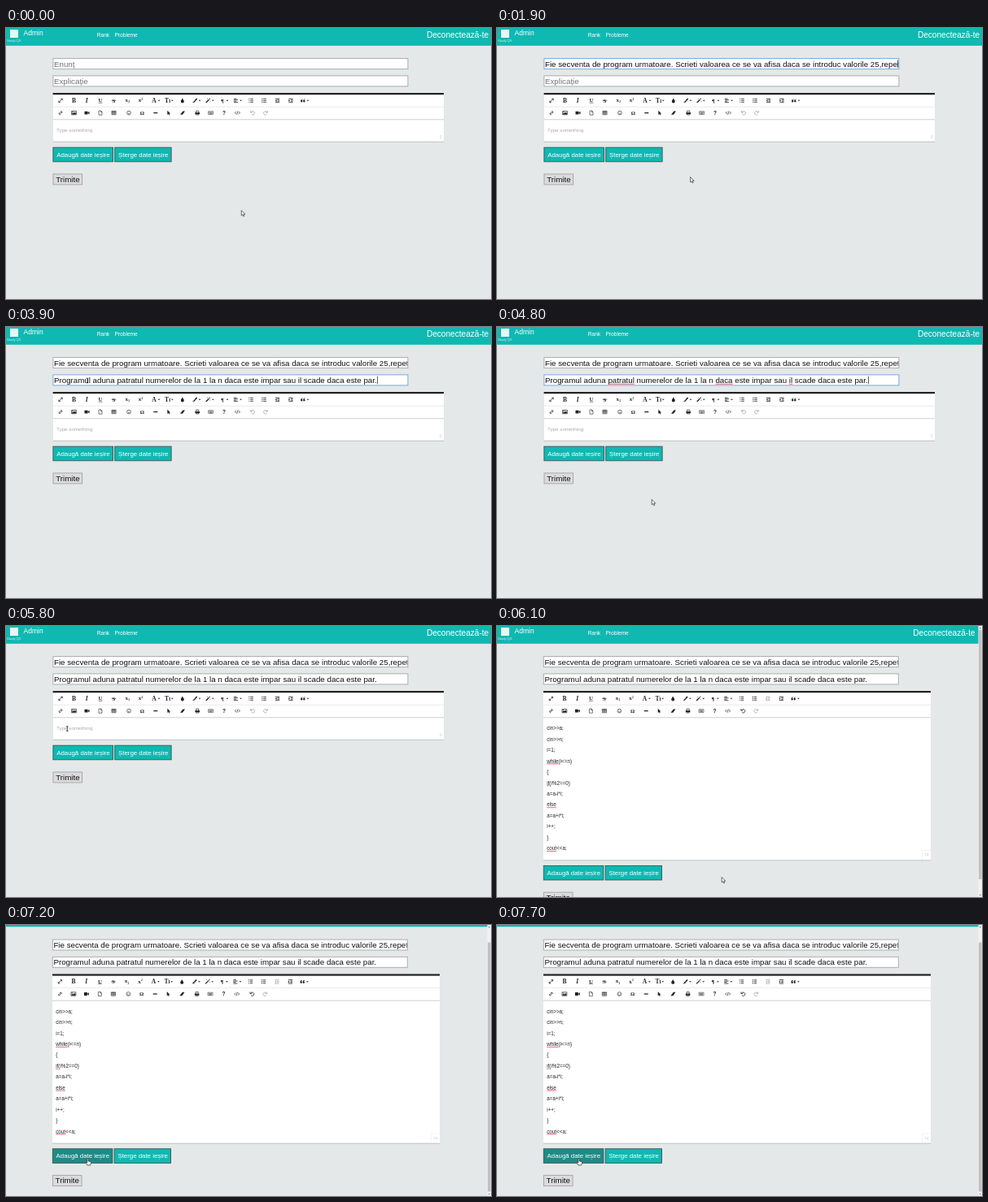
An HTML page for the animation above (8000 ms loop, 596 by 334 pixels).

```html
<!DOCTYPE html>
<html lang="ro">
<head>
<meta charset="utf-8">
<style>
html, body { margin: 0; width: 100%; height: 100%; overflow: hidden; background: #e4e8e8; }
svg { display: block; width: 596px; height: 334px; font-family: "Liberation Sans", Arial, sans-serif; }
text { white-space: pre; }
.serif { font-family: "Liberation Serif", serif; font-weight: bold; }
.icon { stroke: #222; fill: none; }
.icon text, .icon .solid { fill: #222; stroke: none; }
.dim { opacity: .4; }
</style>
</head>
<body>
<svg id="stage" viewBox="0 0 596 334"></svg>
<script>
const LOOP = 8000, TEAL = '#10b8b2', BG = '#e4e8e8';
const stage = document.getElementById('stage');
const pen = document.createElement('canvas').getContext('2d');

const esc = s => s.replace(/&/g, '&amp;').replace(/</g, '&lt;');
const text = (x, y, size, s, fill = '#111', extra = '') =>
  `<text x="${x}" y="${y}" font-size="${size}" fill="${fill}" ${extra}>${esc(s)}</text>`;
const rect = (x, y, w, h, fill, stroke = 'none', extra = '') =>
  `<rect x="${x}" y="${y}" width="${w}" height="${h}" fill="${fill}" stroke="${stroke}" ${extra}/>`;
const path = (d, width = .8, extra = '') => `<path d="${d}" stroke-width="${width}" ${extra}/>`;
const solid = d => `<path class="solid" d="${d}"/>`;
const serif = (s, size = 7.5, x = 0, y = 2.4, extra = '') =>
  text(x, y, size, s, '#222', `class="serif" text-anchor="middle" ${extra}`);

function width(s, size) {
  pen.font = '100px "Liberation Sans", Arial, sans-serif';
  return pen.measureText(s).width * size / 100;
}
function misspelt(x, y, size, line, start, length) {
  const from = x + width(line.slice(0, start), size);
  const to = from + width(line.substr(start, length), size);
  return `<path d="M${from} ${y}H${to}" stroke="#e0455a" stroke-width=".8"/>`;
}

const TASK = 'Fie secventa de program urmatoare. Scrieti valoarea ce se va afisa daca se introduc valorile 25,repetat';
const NOTE = 'Programul aduna patratul numerelor de la 1 la n daca este impar sau il scade daca este par.';
const CODE = ['cin>>a;', 'cin>>n;', 'i=1;', 'while(i<=n)', '{', 'if(i%2==0)', 'a=a-i*i;',
  'else', 'a=a+i*i;', 'i++;', '}', 'cout<<a;'];
const FLAGGED = ['while', 'if', 'else', 'cout'];

const LIST = 'M-.8-2H2.8M-.8 0H2.8M-.8 2H2.8';
const DENT = 'M-2.6-2.2H2.6M0-.7H2.6M0 .8H2.6M-2.6 2.3H2.6';
const UNDO = path('M-1.8-.6A2.2 2.2 0 1 1-1.4 1.7M-2.4-2.6V-.4H-.2', .8);

// [x, drawing, has a dropdown arrow, name]
const ROW1 = [
  [67, path('M-2 2L2-2M.2-2.2H2.2V-.2M-2.2.2V2.2H-.2')],
  [83.5, serif('B')],
  [99.2, serif('I', 7.5, 0, 2.4, 'font-style="italic"')],
  [116, serif('U', 6.8, 0, 1.8) + path('M-2.4 2.8H2.4', .6)],
  [132.5, serif('S', 7) + path('M-2.8 0H2.8', .6)],
  [149, serif('x', 7, -.8, 1.6) + serif('2', 3.6, 2.1, 3)],
  [165.3, serif('x', 7, -.8, 2) + serif('2', 3.6, 2.1, -.6)],
  [182, serif('A'), 1],
  [198.3, serif('T', 7.5, -.8) + serif('I', 6, 2.8, 2.4), 1],
  [216.8, solid('M0-2.8C.8-1.2 2 0 2 1.1A2 1.9 0 0 1-2 1.1C-2 0-.8-1.2 0-2.8Z')],
  [232, path('M2.6-2.4L.2.4', 1.6) + solid('M-.6 0L.8 1.2Q0 2.8-3 2.5Q-1.6 1.8-.6 0Z'), 1],
  [248.3, path('M-2.6 2.6L1.2-1.2', 1.3) + path('M2-2.8V-1.4M1.3-2.1H2.7M-.9-2.7V-1.7M2.6.3V1.3', .6), 1],
  [266, serif('¶', 7), 1],
  [282.5, path('M-2.6-2.2H1M-2.6-.7H2.6M-2.6.8H.6M-2.6 2.3H2.6'), 1],
  [301, path(LIST) + path('M-2.2-2.8V-1.4M-2.7 0H-1.7M-2.7 2H-1.7', .7)],
  [317, path(LIST) + path('M-2.7-2H-1.6M-2.7 0H-1.6M-2.7 2H-1.6', 1)],
  [333.5, path(DENT) + solid('M-.9-1.4V1.6L-2.7 .1Z'), 0, 'outdent'],
  [350, path(DENT) + solid('M-2.6-1.4V1.6L-.8 .1Z')],
  [365, solid('M-.4-2Q-3-1.8-2.9.8A1.2 1.2 0 1 0-1.7-.3Q-1.6-1.1-.4-1.3ZM2.7-2Q.1-1.8.2.8A1.2 1.2 0 1 0 1.4-.3Q1.5-1.1 2.7-1.3Z'), 1]
];
const ROW2 = [
  [67, path('M-.7.7L.7-.7M-.2-1.2L.9-2.1L2.1-.9L1.2.2M.2 1.2L-.9 2.1L-2.1.9L-1.2-.2', .9)],
  [83.5, path('M-2.9-2.2H2.9V2.2H-2.9Z', .7) + solid('M-2.4 1.8V.8L-1.2-.3L-.4.5L1.1-1L2.4.3V1.8ZM-2-1.5h1v1h-1z')],
  [99.5, solid('M-3-1.9H1V1.9H-3ZM1.2-.3L3-1.9V1.9L1.2.3Z')],
  [116, path('M-2-2.6H.6L2-1.2V2.6H-2ZM.5-2.6V-1H2', .6)],
  [132.5, path('M-2.6-2.2H2.6V2.2H-2.6ZM-2.6-1.4H2.6M-2.6.3H2.6M-.9-2V2.2M.9-2V2.2', .6)],
  [151, path('M-2.4 0A2.4 2.4 0 1 1 2.4 0A2.4 2.4 0 1 1-2.4 0M-1.2.8Q0 2 1.2.8M-.9-1V-.4M.9-1V-.4', .6)],
  [167.3, serif('Ω', 6.5, 0, 2.2)],
  [183.8, path('M-2.5 0H2.5', 1.3)],
  [200, solid('M-1.7-2.9L2.1.9H.5L1.3 2.6L.4 3L-.4 1.3L-1.7 2.4Z')],
  [217, solid('M.4-2.2H3L0 2.2H-3Z')],
  [235.2, path('M-1.6-.2V-2.4H1.6V-.2M-1.6 1V2.4H1.6V1', .7) + solid('M-2.8-.5H2.8V1.6H-2.8Z')],
  [251.6, path('M-3-1.8H3V1.8H-3ZM-2.1-.6H2.1M-2.1.3H2.1M-1.3 1.1H1.3', .55)],
  [268, text(0, 2.3, 6.5, '?', '#222', 'font-weight="bold" text-anchor="middle"')],
  [284.3, path('M-1.5-1.6L-3 0L-1.5 1.6M1.5-1.6L3 0L1.5 1.6M.6-2.1L-.6 2.1', .7)],
  [303, UNDO, 0, 'undo'],
  [319, `<g transform="scale(-1 1)">${UNDO}</g>`, 0, 'redo']
];
const toolbar = (row, y, dimmed) => row.map(([x, art, drop, name]) =>
  `<g class="icon ${dimmed.includes(name) ? 'dim' : ''}" transform="translate(${x} ${y})">${art}` +
  (drop ? solid('M4.6-.6H7.4L6 .9Z') : '') + '</g>').join('');

// [until, kind, x, y]
const POINTER = [
  [1000, 'arrow', 289.3, 224.8], [1900, 'beam', 100, 44], [3100, 'arrow', 237.6, 183.6],
  [4100, 'beam', 100, 66], [5100, 'arrow', 190.2, 212.6], [6100, 'beam', 75.3, 126.6],
  [7200, 'arrow', 276.2, 309.6], [LOOP, 'hand', 100.5, 288]
];
const POINTER_ART = {
  arrow: '<path d="M0 0V6.4L1.5 5.1L2.5 7.4L3.6 6.9L2.6 4.7H4.6Z" fill="#fff" stroke="#333" stroke-width=".7"/>',
  beam: '<path d="M-1.3-2.8H1.3M0-2.8V2.8M-1.3 2.8H1.3" stroke="#222" stroke-width=".8"/>',
  hand: '<path d="M-.7.2Q0-.6.7.2V3L3.6 3.8Q4.2 4.2 4 5.4L3.2 8H-.6L-2.8 4.8Q-2.6 4-1.6 4.5L-.7 5.2Z" fill="#fff" stroke="#222" stroke-width=".7"/>'
};

function field(y, value, hint, focused) {
  return rect(57.9, y, 436, 13, '#fff', focused ? '#6f9fe6' : '#a4a7a7', 'stroke-width=".9"') +
    text(59, y + 10, 9.74, value || hint, value ? '#111' : '#757575', 'clip-path="url(#fieldClip)"') +
    (focused ? rect(Math.min(59.3 + (value ? width(value, 9.74) : 0), 492), y + 1.8, .7, 9.6, '#222') : '');
}

function editor(filled) {
  const right = filled ? 533.6 : 538, bottom = filled ? 288.5 : 140, w = right - 57.6;
  const line = (y, h, color) => rect(57.6, y, w, h, color);
  let out = rect(57.6, 81, w, bottom - 80.2, '#bfc3c3') + line(80.6, bottom - 80.8, '#fff') +
    line(80, 2.2, '#222') + line(96.8, .7, '#e2e2e2') + line(112.3, 1, '#cfcfcf') +
    toolbar(ROW1, 89.4, filled ? ['outdent'] : []) +
    toolbar(ROW2, 104.6, filled ? ['redo'] : ['undo', 'redo']);
  if (!filled) return out + text(62, 128.4, 6.25, 'Type something', '#aaa') + text(532.7, 136.4, 5, '0', '#ccc');
  CODE.forEach((s, i) => {
    const y = 128.3 + i * 13.45;
    out += text(61.8, y, 6.3, s, '#222');
    const word = FLAGGED.find(f => s.startsWith(f));
    if (word) out += misspelt(61.8, y + 1.3, 6.3, s, 0, word.length);
  });
  return out + `<path d="M523 288V276.5H533.3" fill="none" stroke="#eee" stroke-width=".7"/>` +
    text(525.6, 284.2, 5, '74', '#ccc');
}

const button = (x, y, w, label, hover) =>
  rect(x, y, w, 17.6, hover ? '#1f8a86' : TEAL, '#3d5352', 'stroke-width=".9"') +
  text(x + 4.3, y + 11.5, 7.85, label, '#fff');

function scrollbar(top) {
  return rect(591.5, 0, 4.5, 334, '#f1f1f1') + rect(592, top, 3.6, 307, '#c1c1c1') +
    '<path d="M592.6 3.2L593.8 1.6L595 3.2ZM592.6 331L593.8 332.6L595 331Z" fill="#777"/>';
}

function draw(t) {
  const filled = t >= 6100, scrolled = t >= 7200;
  const drop = filled ? 148.2 : 0, scroll = scrolled ? 19.6 : 0;
  const flagNote = t >= 4100 && t < 5800;
  const [, kind, px, py] = POINTER.find(p => t < p[0]);
  const words = [NOTE.indexOf('patratul'), NOTE.indexOf('daca'), NOTE.indexOf('il ')];

  return '<defs><clipPath id="fieldClip"><rect x="58" y="30" width="435.2" height="50"/></clipPath></defs>' +
    rect(0, 0, 596, 334, BG) +
    `<g transform="translate(0 ${-scroll})">` +
    rect(0, 0, 596, 21.8, TEAL) +
    rect(5, 2, 10, 10, '#e6f7f6') +
    text(1, 16.8, 4.1, 'Study QX', '#d8f3f1') +
    text(21.6, 9.2, 8.5, 'Admin', '#fff') +
    text(111.7, 11.2, 6.65, 'Rank', '#fff') +
    text(133.4, 11.2, 6.65, 'Probleme', '#fff') +
    text(filled ? 587.6 : 593.2, 12, 10.1, 'Deconectează-te', '#fff', 'text-anchor="end"') +
    `<g transform="translate(${filled ? -.6 : 0} 0)">` +
    field(37.6, t >= 1900 ? TASK : '', 'Enunț', t >= 1000 && t < 2900) +
    field(58.9, t >= 3900 ? NOTE : '', 'Explicație', t >= 3100 && t < 5100) +
    (flagNote ? words.map((at, i) => misspelt(59, 70.3, 9.74, NOTE, at, [8, 4, 2][i])).join('') : '') +
    editor(filled) +
    button(57.9, 147.2 + drop, 73.6, 'Adaugă date ieșire', scrolled) +
    button(133.7, 147.2 + drop, 69.4, 'Șterge date ieșire') +
    rect(58, 180 + drop, 35.6, 13, '#dcdcdc', '#a2a2a2', 'stroke-width=".9"') +
    text(61.2, 189.9 + drop, 9.74, 'Trimite') +
    '</g></g>' +
    (filled ? scrollbar(scrolled ? 21.5 : 5) : '') +
    `<g transform="translate(${px} ${py})">${POINTER_ART[kind]}</g>`;
}

const CUTS = [1000, 1900, 2900, 3100, 3900, 4100, 5100, 5800, 6100, 7200];
let shown = -1;
function frame() {
  const t = performance.now() % LOOP;
  const scene = CUTS.filter(cut => t >= cut).length;
  if (scene !== shown) {
    stage.innerHTML = draw(t);
    shown = scene;
  }
  requestAnimationFrame(frame);
}
frame();
</script>
</body>
</html>
```
